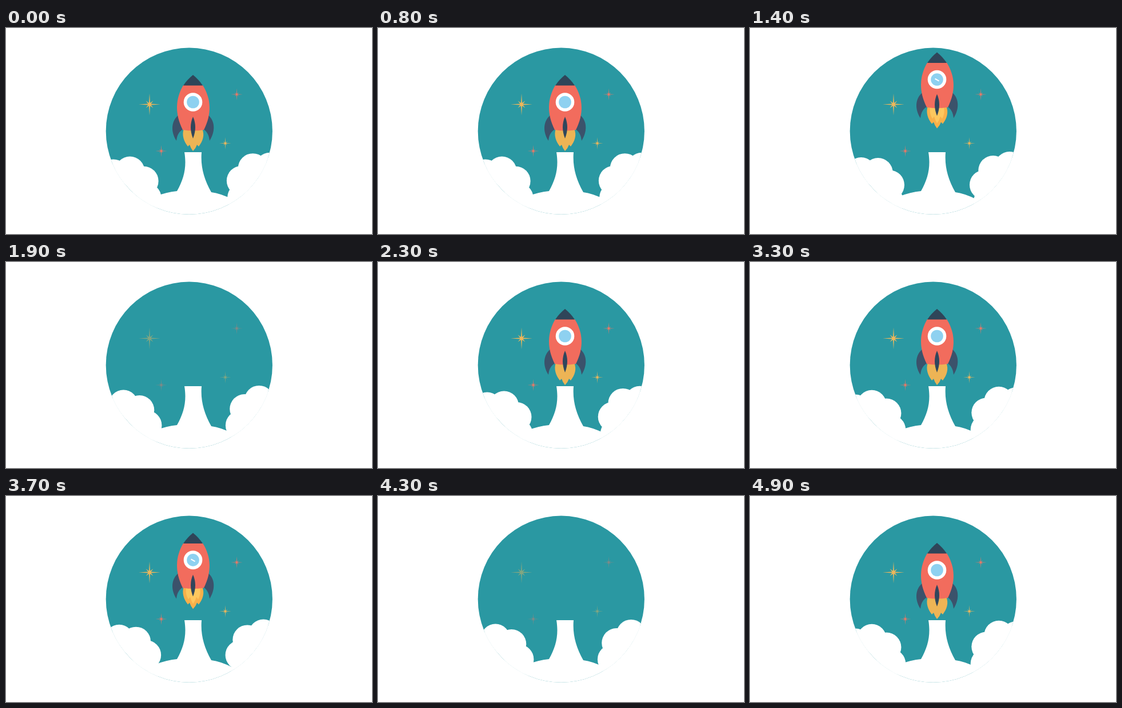
Recreate the animation shown at these times as an HTML page with a canvas. Size 640x360 px, loop 5000 ms.

```html
<!DOCTYPE html>
<html lang="en">
<head>
<meta charset="utf-8">
<title>Rocket launch</title>
<style>
html, body { margin: 0; width: 100%; height: 100%; overflow: hidden; background: #fff; }
canvas { display: block; }
</style>
</head>
<body>
<canvas id="stage" width="640" height="360"></canvas>
<script>
const ctx = document.getElementById('stage').getContext('2d');
const LOOP = 5000, STEP = 100, CYCLE = 2400;
const TEAL = '#2a98a2', NAVY = '#3b526b', RED = '#f26c5d', GOLD = '#efb75a';

const shapes = {
  fins: new Path2D('M302 152C291 160 286 178 298 197C299 187 303 180 310 177ZM353 152C364 160 368 178 356 197C355 187 351 180 345 177Z'),
  flame: new Path2D('M311 176C307 187 311 198 318 207L321 204Q323 210 327 215Q332 210 334 204L337 207C344 198 348 187 343 176Z'),
  core: new Path2D('M315 176C314 186 315 191 319 198L322 194Q324 201 327 206Q331 201 333 194L336 198C340 191 340 186 339 176Z'),
  body: new Path2D('M310 100C296 124 295 150 309 178Q327 181 346 178C360 150 359 124 344 100Z'),
  nose: new Path2D('M327 82Q337 90 344 100.5H310Q317 90 327 82Z'),
  keel: new Path2D('M327 155Q335 173 327 193Q319 173 327 155Z'),
  smoke: new Path2D('M312 217H342C340 242 346 264 359 287Q375 289 395 299L440 340H200L262 294Q280 287 299 285C312 262 316 242 312 217Z')
};

// x, y, reach, diagonal reach, colour
const stars = [
  [251, 133.5, 19, 9, GOLD],
  [403.5, 116, 10.5, 5, '#ee7765'],
  [383.5, 201.5, 10.5, 5, GOLD],
  [271.5, 215, 10.5, 5, '#ee7765']
];

const clamp = v => Math.min(1, Math.max(0, v));

function fill(shape, color) {
  ctx.fillStyle = color;
  ctx.fill(shape);
}

function disc(x, y, r, color) {
  const p = new Path2D();
  p.arc(x, y, r, 0, 7);
  fill(p, color);
}

function star(x, y, long, diag, color) {
  const p = new Path2D();
  for (let i = 0; i < 16; i++) {
    const r = i % 2 ? long * 0.14 : i % 4 ? diag : long;
    const a = i * Math.PI / 8;
    p.lineTo(x + r * Math.cos(a), y + r * Math.sin(a));
  }
  fill(p, color);
}

// A wheel of eight puffs; angle is the direction of one notch
function cloud(x, y, angle) {
  disc(x, y, 54, '#fff');
  for (let i = 0; i < 8; i++) {
    const a = (angle + 22.5 + i * 45) * Math.PI / 180;
    disc(x + 38.7 * Math.cos(a), y + 38.7 * Math.sin(a), 25.8, '#fff');
  }
}

function rocket(lift, alpha, glow) {
  ctx.save();
  ctx.globalAlpha = alpha;
  ctx.translate(0, -lift);
  fill(shapes.fins, NAVY);
  fill(shapes.flame, glow ? '#f8b04a' : '#edb455');
  if (glow) fill(shapes.core, '#fdc75e');
  fill(shapes.body, RED);
  fill(shapes.nose, '#2f4559');
  disc(327, 129.5, 16.3, '#fff');
  disc(327, 129.5, 10.8, '#8ed1f0');
  if (glow) {
    ctx.strokeStyle = '#fff';
    ctx.lineWidth = 2;
    ctx.beginPath();
    ctx.moveTo(323.5, 128);
    ctx.lineTo(330.5, 132);
    ctx.stroke();
  }
  fill(shapes.keel, '#30465c');
  ctx.restore();
}

function draw(time) {
  const phase = time % CYCLE;
  const turn = time * 0.05625;
  const returned = phase >= 1900;
  const flight = Math.max(0, phase - 1050) / 250;

  ctx.fillStyle = '#fff';
  ctx.fillRect(0, 0, 640, 360);
  ctx.save();
  ctx.beginPath();
  ctx.arc(320.3, 180.2, 145.6, 0, 7);
  ctx.clip();
  ctx.fillStyle = TEAL;
  ctx.fillRect(160, 20, 320, 320);

  ctx.globalAlpha = 1 - 0.55 * clamp(1 - Math.abs(phase - 1900) / 350);
  for (const s of stars) star(...s);
  ctx.globalAlpha = 1;

  fill(shapes.smoke, '#fff');
  if (returned) rocket(0, clamp((phase - 1900) / 400), false);
  else rocket(17.6 * flight ** 2.4, 1, flight > 0);

  cloud(208, 288, -54.5 - turn);
  cloud(448, 280, 222.5 + turn);
  ctx.restore();
}

function tick() {
  draw(Math.floor(performance.now() % LOOP / STEP) * STEP);
  requestAnimationFrame(tick);
}
tick();
</script>
</body>
</html>
```
